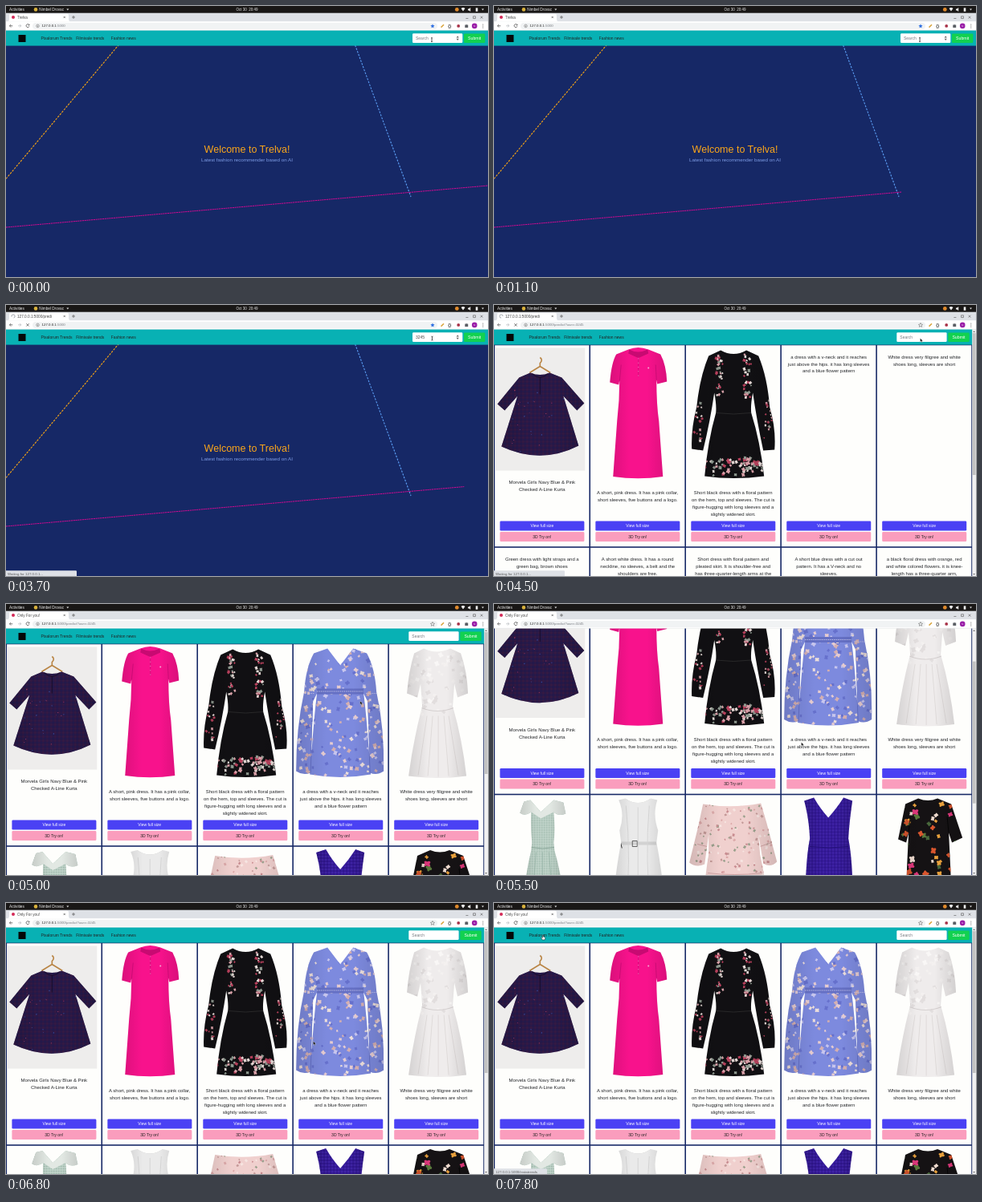
Recreate the animation shown at these times as an HTML page. Size 600 by 338 pixels, loop 8 s.

```html
<!DOCTYPE html>
<html lang="en">
<head>
<meta charset="utf-8">
<title>Fashion recommender</title>
<style>
html, body { margin: 0; width: 100%; height: 100%; overflow: hidden; background: #162866; }
svg { display: block; width: 600px; height: 338px; }
text { font-family: "Liberation Sans", Arial, sans-serif; white-space: pre; }
</style>
</head>
<body>
<svg id="stage" viewBox="0 0 600 338" xmlns="http://www.w3.org/2000/svg"></svg>
<script>
const LOOP = 8000, LEFT = .3, COL = 118.95, ROW = 252.5, TOP = 49.5;
const COMMIT = 4200, LOADED = 4900;

const rect = (x, y, w, h, fill, more = '') =>
  `<rect x="${x}" y="${y}" width="${w}" height="${h}" fill="${fill}" ${more}/>`;
const circle = (x, y, r, fill, more = '') =>
  `<circle cx="${x}" cy="${y}" r="${r}" fill="${fill}" ${more}/>`;
const path = (d, fill, more = '') => `<path d="${d}" fill="${fill}" ${more}/>`;
const stroke = (d, color, width = .7, more = '') =>
  path(d, 'none', `stroke="${color}" stroke-width="${width}" ${more}`);
const text = (x, y, s, size, fill = '#222', more = '') =>
  `<text x="${x}" y="${y}" font-size="${size}" fill="${fill}" ${more}>${s.replace(/&/g, '&amp;')}</text>`;
const group = (id, body, more = '') => `<g id="${id}" ${more}>${body}</g>`;
const MID = 'text-anchor="middle"';

function random(seed) {
  return () => (seed = (seed * 16807) % 2147483647) / 2147483647;
}

// Scatter little blossoms inside a box: n, radius, colours, x, y, w, h
function scatter([n, r, colors, x, y, w, h], seed) {
  const rnd = random(seed);
  let out = '';
  for (let i = 0; i < n; i++) {
    const cx = x + rnd() * w, cy = y + rnd() * h, k = r * (.6 + rnd() * .7);
    const color = colors[Math.floor(rnd() * colors.length)];
    const petal = turn => `<ellipse rx="${k.toFixed(1)}" ry="${(k * .45).toFixed(1)}" transform="rotate(${turn})"/>`;
    const turn = Math.floor(rnd() * 180);
    out += `<g fill="${color}" transform="translate(${cx.toFixed(1)} ${cy.toFixed(1)})">` +
      petal(turn) + petal(turn + 75) + '</g>';
  }
  return out;
}

const BLOOM = ['#e8dcd8', '#b8405c', '#d9a0a8', '#8f9a90'];
const GARDEN = ['#d9562e', '#e0387c', '#e9a13c', '#f0dcd0', '#5a7a3c', '#48683c'];

const cards = [
  { at: 4200, lines: ['Morvela Girls Navy Blue & Pink', 'Checked A-Line Kurta'], textY: 171.5,
    under: rect(1, 4, 112, 153, '#eeedec') + stroke('M57 16Q61 19 57 23V27L44 35M57 27L70 35', '#b98545', 1.6),
    d: 'M45 35Q57 40 69 35L84 41L112 73L103 82L86 64L105 126Q58 150 9 127L29 64L13 82L4 74L31 41Z',
    fill: '#261440', pattern: 'plaid',
    spots: [[30, .7, ['#7a2858', '#3a4a9a', '#a03a60'], 22, 55, 72, 82]],
    over: stroke('M47 36Q57 46 67 36M57 41V62', '#120a24', .8) },
  { at: 4300, lines: ['A short, pink dress. It has a pink collar,', 'short sleeves, five buttons and a logo.'],
    d: 'M48 6Q60 1 73 6L88 12Q95 25 96 46L84 49L83 44Q83 75 86 95L91 164.5Q60 169 29 164.5L34 95Q37 70 37 44L36 50L25 47Q27 22 33 12Z',
    fill: '#f8128c',
    over: path('M49 6Q60 12 72 6L73 11L62 16L59 16L48 11Z', '#c80a72') +
      stroke('M60.5 14V40M37 46L39 25M83 44L82 25', '#d00b78', .8) +
      stroke('M60.5 17V40', '#fbd0e6', .8, 'stroke-dasharray=".8 4.5"') + circle(73, 29, 1, '#f7b0d8') },
  { at: 4500, lines: ['Short black dress with a floral pattern', 'on the hem, top and sleeves. The cut is', 'figure-hugging with long sleeves and a', 'slightly widened skirt.'],
    d: 'M44 7Q60 16 76 7L91 14Q102 40 105 78Q113 105 111 131L97 132Q89 95 84 60Q81 75 82 85Q93 120 98 164Q60 169 24 164Q28 120 38 85Q39 75 36 60Q31 95 22 132L8 130Q7 105 14 78Q18 40 29 14Z',
    fill: '#111013',
    spots: [[30, 1.9, BLOOM, 38, 12, 9, 54], [30, 1.9, BLOOM, 73, 12, 9, 54], [62, 2.5, BLOOM, 24, 141, 74, 22],
      [20, 1.7, BLOOM, 11, 68, 10, 52], [20, 1.7, BLOOM, 98, 68, 10, 52]],
    over: stroke('M38 85Q60 88 82 85', '#333', .7) },
  { at: 4600, lines: ['a dress with a v-neck and it reaches', 'just above the hips. it has long sleeves', 'and a blue flower pattern'],
    d: 'M43 6L59 27L75 6L92 12Q102 30 104 60Q114 105 113 159Q104 165 96 161L93 72L88 62Q91 85 94 125L97 163Q59 170 21 163L24 125Q27 85 30 62L25 72L22 161Q13 165 4 159Q4 105 14 60Q16 30 26 12Z',
    fill: '#7d8ade',
    spots: [[230, 2.5, ['#e6ccd0', '#d6b0b0', '#c8c6ee', '#6670cc', '#ecdeda'], 4, 6, 110, 160]],
    over: path('M30 56H88V63H30Z', '#6570c4') +
      stroke('M30 59.5H88M13 62H27M91 62H106', '#c9c8ee', 1, 'stroke-dasharray="1.2 1.2"') +
      stroke('M22 161L25 72M96 161L93 72', '#5b66bc', .7) },
  { at: 4600, lines: ['White dress very filigree and white', 'shoes long, sleeves are short'],
    d: 'M44 6Q60 14 77 6L90 12Q98 35 99 62L86 67L82 50L80 78Q92 120 97 165Q61 170 25 165Q31 120 42 78L40 50L36 67L23 62Q25 35 32 12Z',
    fill: '#efecec',
    spots: [[70, 2.8, ['#f9f7f6', '#e2dede', '#f4f1f0'], 24, 12, 74, 76]],
    over: stroke('M41 80Q61 88 81 80', '#d5d0d0', 1.2) +
      stroke('M48 90L37 164M55 90L49 165M62 90V166M69 90L75 165M75 90L87 164', '#dfdbda', 1) },
  { at: 4700, lines: ['Green dress with light straps and a', 'green bag, brown shoes'],
    d: 'M45 7L58 22L74 7L86 10L89 24Q80 28 74 22Q76 45 74 60L75 70Q87 110 88 164Q61 170 35 164Q36 110 46 70L47 60Q45 40 46 22Q38 28 32 23L37 9Z',
    fill: '#b4cabf', pattern: 'mint',
    over: path('M45 7L58 22L74 7L86 10L89 24Q80 28 74 22L58 30L46 22Q38 28 32 23L37 9Z', '#e2e8e3') +
      stroke('M46 66Q60 69 75 66', '#8ba89b', 1) +
      stroke('M52 72L45 164M60 72V166M68 72L76 164', '#98b4a8', .8) },
  { at: 4700, lines: ['A short white dress. It has a round', 'neckline, no sleeves, a belt and the', 'shoulders are free.'],
    d: 'M44 5Q60 16 76 5L84 7Q78 25 85 45L83 60Q91 100 95 158Q61 175 27 158Q31 100 39 60L37 45Q44 25 36 7Z',
    fill: '#eaeaea',
    over: path('M44 5Q60 1 76 5Q60 16 44 5Z', '#bcbcbc') +
      stroke('M39 61H83', '#d2d2d2', 4) + stroke('M53 58H59V65H53Z', '#2a2a2a', .7) + stroke('M38 59L40 67', '#333', 1) +
      stroke('M45 14Q52 80 44 160M74 14Q68 80 77 160M60 16V160', '#d4d4d4', .9) },
  { at: 4800, lines: ['Short dress with floral pattern and', 'pleated skirt. It is shoulder-free and', 'has three-quarter-length arms at the', 'bottom.'],
    d: 'M22 12Q58 18 94 11L101 35L114 84Q106 92 97 86L91 50L93 75Q103 120 103 160Q62 166 21 160Q23 110 29 75L29 50L24 87Q13 92 5 85L16 40Z',
    fill: '#f0d0ce',
    spots: [[260, 1.7, ['#c49a98', '#dba8a8', '#9aa08c', '#f7e6e2', '#c88c90'], 4, 10, 110, 152]],
    over: stroke('M24 130Q60 136 101 130M28 98Q60 102 96 98M15 62L27 65M93 65L107 60', '#cfa4a4', 1) },
  { at: 4800, lines: ['A short blue dress with a cut out', 'pattern. It has a V-neck and no', 'sleeves.'],
    d: 'M29 8L41 4Q49 18 59 29Q69 18 78 4L89 8Q85 35 84 55Q91 90 89 163Q60 168 31 163Q29 90 36 55Q35 30 29 8Z',
    fill: '#351a9a', pattern: 'lace',
    over: stroke('M36 65Q60 68 84 65', '#24107a', 1) },
  { at: 4900, lines: ['a black floral dress with orange, red', 'and white colored flowers. it is knee-', 'length has a three-quarter arm,'],
    d: 'M52 5Q64 10 76 5L93 12L107 54L94 60L90 48L92 90L95 164Q65 168 36 164L38 90L40 48L37 60L27 56L36 12Z',
    fill: '#151214',
    spots: [[70, 3.6, GARDEN, 28, 12, 78, 150]],
    over: stroke('M40 48L42 28M90 48L88 28', '#000', .8) },
];

function button(y, fill, label, color) {
  return rect(7.1, y, 105, 12, fill, 'rx="1.3"') + text(59.5, y + 7.8, label, 5, color, MID);
}

function card(c, i) {
  const x = LEFT + i % 5 * COL, y = TOP + Math.floor(i / 5) * ROW;
  const flowers = (c.spots || []).map((s, k) => scatter(s, 911 + i * 77 + k * 13)).join('');
  const picture = (c.under || '') +
    `<clipPath id="cut${i}"><path d="${c.d}"/></clipPath>` + path(c.d, c.fill) +
    (c.pattern ? path(c.d, `url(#${c.pattern})`) : '') +
    `<g clip-path="url(#cut${i})">${flowers}${c.over}</g>` + path(c.d, 'url(#volume)');
  const words = c.lines.map((s, k) => text(59.5, k * 8.9 + 2.1, s, 5.95, '#24262a', MID)).join('');
  return `<g transform="translate(${x} ${y})">` +
    rect(.8, .8, COL - 1.6, ROW - 1.6, '#fefefc') +
    group('picture' + i, picture) + group('words' + i, words) +
    button(220, '#4a41f4', 'View full size', '#fff') + button(233.6, '#fa9dbd', '3D Try on!', '#222') + '</g>';
}

function form(id, dx, typed) {
  return group(id, rect(506, 34.2, 62.3, 11.8, '#fff', 'rx="1.3"') +
    text(510, 41.8, 'Search', 5, '#777c82', typed ? 'id="query"' : '') +
    (typed ? path('M560.6 39.4L562.2 37.2L563.8 39.4ZM560.6 40.8L562.2 43L563.8 40.8Z', '#666') : '') +
    rect(570, 34.4, 26.4, 11.6, '#12d150', 'rx="1.3"') + text(583.2, 42, 'Submit', 5.2, '#fff', MID),
    `transform="translate(${dx} 0)"`);
}

const navbar = rect(0, 30, 600, 19.6, '#08b1b4') + rect(15.5, 36, 9, 9, '#050808') +
  text(43.6, 41.8, 'Pixalorum Trends', 5) + text(87.3, 41.8, 'Filmivale trends', 5) +
  text(130.8, 41.8, 'Fashion news', 5);

const welcome = group('lines',
    '<line stroke="#f6a414" stroke-width="1.1" stroke-dasharray="2.6 1.4"/>' +
    '<line stroke="#5a9cf2" stroke-width="1.1" stroke-dasharray="2.4 1.6"/>' +
    '<line stroke="#cf0a90" stroke-width="1" stroke-dasharray="2.2 .6"/>') +
  text(300, 183, 'Welcome to Trelva!', 12.5, '#fba61a', MID) +
  text(300, 194, 'Latest fashion recommender based on AI', 6.25, '#7f9de6', MID) +
  navbar + form('home', 0, true);

const results = group('scroller', cards.map(card).join('') + navbar + form('search', -4.7, false)) +
  rect(595.2, 30, 4.8, 308, '#f1f1f1') + path('M596.3 34L597.6 32.2L598.9 34ZM596.3 335L597.6 336.8L598.9 335Z', '#666') +
  rect(595.7, 35, 3.8, 177, '#c1c1c1', 'id="thumb"');

const desktopBar = rect(0, 0, 600, 8.7, '#191716') + text(4, 6.1, 'Activities', 4.8, '#eee') +
  circle(37, 4.4, 2.3, '#d8b13c') + text(41.3, 6.1, 'Nimbel Drovac', 4.7, '#eee') +
  path('M75.3 3.6H78.3L76.8 5.6Z', '#ddd') + text(300, 6.1, 'Oct 30\u00a0 20:49', 4.5, '#eee', MID) +
  circle(561.3, 4.4, 2.4, '#e08a2c') + path('M566.5 3Q569 1 571.5 3L569 6.6Z', '#eee') +
  path('M575 3.5H576.4L578.2 2V7L576.4 5.4H575Z', '#eee') + rect(584.7, 2.4, 2.6, 4.4, '#eee') +
  path('M592 3.6H595L593.5 5.6Z', '#ddd');

const tabs = path('M2 19.2Q4 19 4 16V12Q4 9.8 6 9.8H76Q78 9.8 78 12V16Q78 19 80 19.2Z', '#fff') +
  circle(9, 14, 2, '#d42a58', 'id="icon"') +
  stroke('M9 11.9A2.1 2.1 0 1 1 6.9 14', '#8a8f96', .7, 'id="spinner"') +
  text(14, 15.7, '', 4.7, '#444', 'id="title"') +
  rect(60, 10.5, 9.5, 7, 'url(#fade)') +
  stroke('M71.6 12.9L73.8 15.1M73.8 12.9L71.6 15.1M82 14H86M84 12V16', '#444', .6) +
  stroke('M572.4 15.5H575.4M581.6 12.8H584.4V15.6H581.6ZM590.6 12.8L593.4 15.6M593.4 12.8L590.6 15.6', '#555', .6);

const toolbar = rect(0, 19.2, 600, 11.1, '#fff') + rect(33, 21, 504, 8, '#f1f3f4', 'rx="4"') +
  stroke('M8.3 24.8H4.5M6.2 23L4.4 24.8L6.2 26.6', '#444', .7) +
  stroke('M15 24.8H18.8M17 23L18.8 24.8L17 26.6', '#b5b8bc', .7) +
  stroke('M28.8 23.6A2 2 0 1 0 29 25.3M29 22.6V24H27.6', '#444', .7, 'id="reload"') +
  stroke('M25.3 23.1L28.7 26.5M28.7 23.1L25.3 26.5', '#444', .7, 'id="stop"') +
  circle(39.5, 24.9, 1.8, 'none', 'stroke="#555" stroke-width=".5"') + rect(39.2, 24.4, .6, 1.5, '#555') +
  `<text x="44.5" y="26.4" font-size="4.4" fill="#777b80"><tspan fill="#222">127.0.0.1</tspan><tspan id="address"></tspan></text>` +
  path('M531 22.4L531.8 24.1L533.6 24.3L532.2 25.5L532.6 27.3L531 26.4L529.4 27.3L529.8 25.5L528.4 24.3L530.2 24.1Z',
    '#2f6fe0', 'id="star" stroke-width=".5"') +
  stroke('M541.5 26.6L545 23.2', '#d8a33a', 1.5) + text(550.2, 26.5, '{}', 5, '#333', 'font-weight="bold"') +
  circle(563.2, 24.9, 1.9, '#a83248') + path('M571.3 23.4H572.4A.9 .9 0 0 1 574 23.4H575.2V27H571.3Z', '#5c6066') +
  circle(583.2, 24.9, 3.3, '#9a1fa8') + text(583.2, 26.1, 's', 3.4, '#fff', MID) +
  [22.9, 24.9, 26.9].map(y => circle(593.8, y, .5, '#444')).join('') + rect(0, 29.9, 600, .5, '#dcdfe2');

// An opaque backing keeps the scrolled page from showing through the seams.
const browser = rect(0, 0, 600, 30, '#dee1e6') + desktopBar + tabs + toolbar;

const cursors =
  group('beam', stroke('M-1 -2.4Q0 -2.4 0 -1.8Q0 -2.4 1 -2.4M0 -1.8V2M-1 2.6Q0 2.6 0 2Q0 2.6 1 2.6', '#111', .7)) +
  group('arrow', path('M0 0V4.6L1.1 3.6L1.9 5.3L2.7 4.9L1.9 3.3H3.4Z', '#111', 'stroke="#fff" stroke-width=".3"')) +
  group('hand', path('M-.6 -2.4Q0 -3 .5 -2.4V-.4L2.4 .2Q3 .5 2.8 1.4L2.2 3.4H-.8L-2.2 .9Q-2 0 -1.3 .5L-.6 1Z', '#fff', 'stroke="#111" stroke-width=".5"'));

const defs = `<defs>
<linearGradient id="volume"><stop offset="0" stop-opacity=".12"/><stop offset=".35" stop-opacity="0"/>
<stop offset=".65" stop-opacity="0"/><stop offset="1" stop-opacity=".12"/></linearGradient>
<linearGradient id="fade"><stop offset="0" stop-color="#fff" stop-opacity="0"/><stop offset=".7" stop-color="#fff"/></linearGradient>
<pattern id="plaid" width="5" height="5" patternUnits="userSpaceOnUse"><path d="M0 1H5M1 0V5" stroke="#43204a" stroke-width=".6"/><path d="M0 3.5H5M3.5 0V5" stroke="#221f56" stroke-width=".6"/></pattern>
<pattern id="mint" width="3" height="3" patternUnits="userSpaceOnUse"><circle cx="1" cy="1" r=".7" fill="#d9e6de"/><circle cx="2.5" cy="2.5" r=".5" fill="#8fae9f"/></pattern>
<pattern id="lace" width="4" height="4" patternUnits="userSpaceOnUse"><circle cx="1" cy="1" r=".7" fill="#5436c0"/><circle cx="3" cy="3" r=".7" fill="#220c70"/></pattern>
</defs>`;

document.getElementById('stage').innerHTML = defs + rect(0, 0, 600, 338, '#162866') +
  group('welcome', welcome) + group('results', results) +
  group('status', rect(-2, 331.3, 90, 9, '#dee1e6', 'id="statusBox" rx="1.2"') + text(2, 336.6, '', 4.4, '#555', 'id="statusText"')) +
  browser + group('cursor', cursors);

const $ = id => document.getElementById(id);
const show = (id, on) => $(id).setAttribute('display', on ? 'inline' : 'none');
const put = (el, attrs) => Object.entries(attrs).forEach(([k, v]) => el.setAttribute(k, v));
const label = (id, s) => { if ($(id).textContent !== s) $(id).textContent = s; };
const stepAt = (table, t) => table.filter(([at]) => at <= t).pop()[1];

// start x, start y, direction, longest length
const rays = [[0, 215.5, 139, -165.5, 1200], [427.7, 30, 69, 188, 221.5], [0, 276, 600, -52, 1200]];
const typing = [[0, ''], [2200, '3'], [2600, '32'], [2900, '324'], [3200, '3245']];
const scrolling = [[0, 0], [5400, 28], [5500, 64.5], [5600, 104], [5700, 132],
  [6000, 207], [6100, 215], [6200, 217.5], [6500, 140], [6700, 45], [6800, 0]];
const moves = [[0, 530, 42], [4200, 530.5, 41.5], [4600, 530.5, 41.5], [5300, 382.5, 172.5],
  [7000, 382.5, 172.5], [7600, 64, 43], [7800, 61, 42.5], [LOOP, 61, 42.5]];

function pointer(t) {
  const k = moves.findIndex(m => m[0] > t);
  const [t0, x0, y0] = moves[k - 1], [t1, x1, y1] = moves[k];
  const p = (t - t0) / (t1 - t0), e = p * p * (3 - 2 * p);
  return [x0 + (x1 - x0) * e, y0 + (y1 - y0) * e];
}

function draw(t) {
  const onResults = t >= COMMIT, loading = t >= 3700 && t < LOADED, hover = t >= 7600;
  show('welcome', !onResults);
  show('results', onResults);

  const reach = .416 * Math.abs(t - 2324);
  rays.forEach(([x, y, dx, dy, max], i) => {
    const k = Math.min(reach, max) / Math.hypot(dx, dy);
    put($('lines').children[i], { x1: x, y1: y, x2: x + dx * k, y2: y + dy * k });
  });
  const typed = stepAt(typing, t);
  label('query', typed || 'Search');
  put($('query'), { fill: typed ? '#444' : '#777c82' });

  const scroll = stepAt(scrolling, t);
  put($('scroller'), { transform: `translate(0 ${-scroll})` });
  put($('thumb'), { y: 35 + scroll * .568 });
  cards.forEach((c, i) => {
    const ready = t >= c.at;
    show('picture' + i, ready);
    put($('words' + i), { transform: `translate(0 ${ready ? c.textY || 184.3 : 15})` });
  });

  show('icon', !loading);
  show('spinner', loading);
  put($('spinner'), { transform: `rotate(${t * .36} 9 14)` });
  show('reload', !loading);
  show('stop', loading);
  label('title', loading ? '127.0.0.1:5000/predi' : onResults ? 'Only For you!' : 'Trelva');
  label('address', onResults ? ':5000/predict?user=3245' : ':5000');
  put($('star'), { fill: onResults ? 'none' : '#2f6fe0', stroke: onResults ? '#555' : 'none' });
  show('status', loading || hover);
  label('statusText', hover ? '127.0.0.1:5000/instatrends' : 'Waiting for 127.0.0.1...');
  put($('statusBox'), { width: hover ? 68 : 90 });

  const [x, y] = pointer(t);
  put($('cursor'), { transform: `translate(${x} ${y})` });
  show('beam', !onResults);
  show('arrow', onResults && !hover);
  show('hand', hover);
}

const start = performance.now();
function tick() {
  draw(Math.floor((performance.now() - start) % LOOP / 100) * 100);
  requestAnimationFrame(tick);
}
tick();
</script>
</body>
</html>
```
